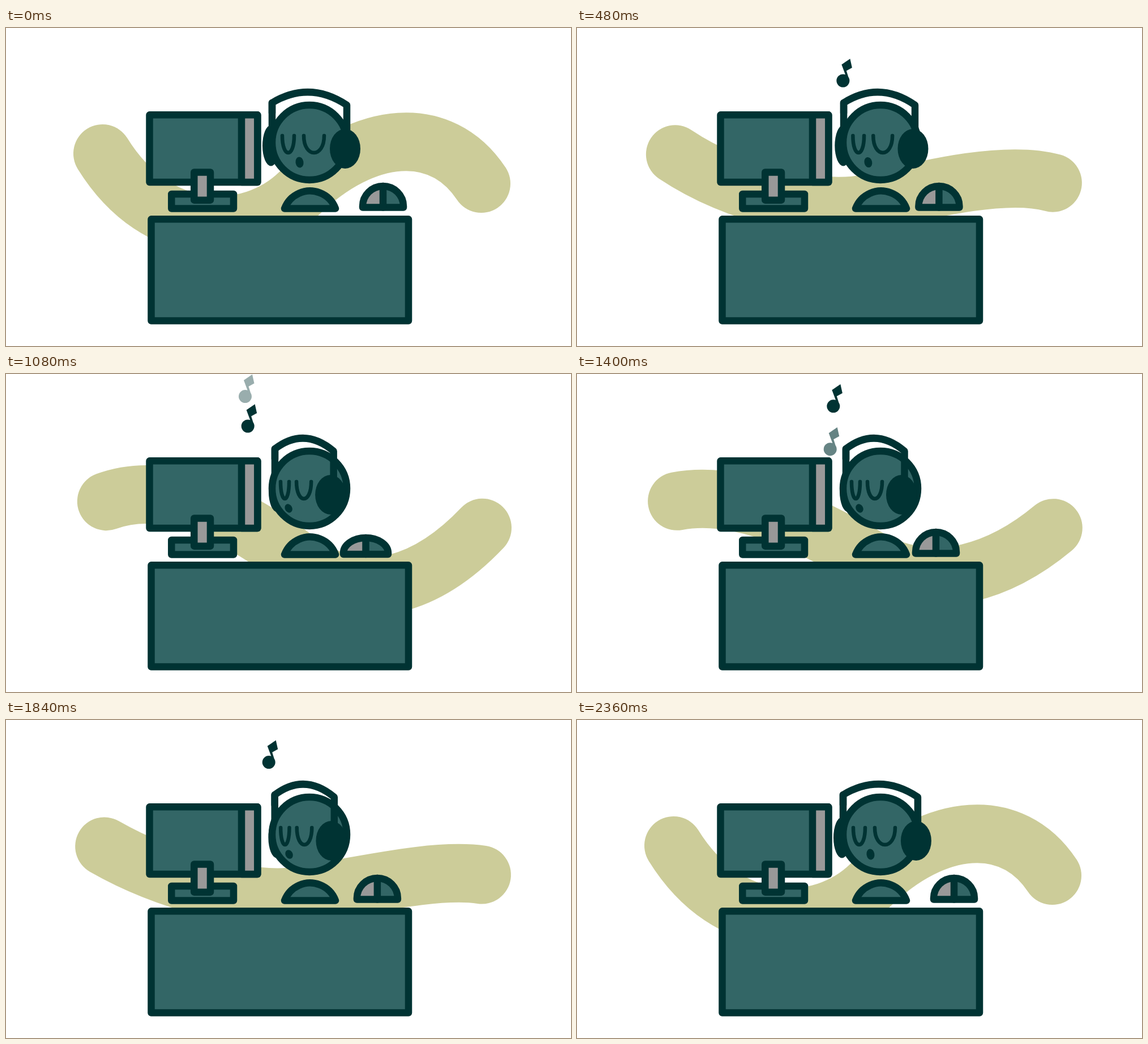
Recreate the animation shown at these times as an HTML page with a canvas. Size 998x561 px, loop 2400 ms.

```html
<!DOCTYPE html>
<html lang="en">
<head>
<meta charset="utf-8">
<title>Music at the desk</title>
<style>
  html, body { margin: 0; width: 100%; height: 100%; overflow: hidden; background: #fff; }
  canvas { display: block; width: 100vw; height: 100vh; }
</style>
</head>
<body>
<canvas id="stage" width="998" height="561"></canvas>
<script>
const ctx = document.getElementById('stage').getContext('2d');
const DARK = '#003333', TEAL = '#336666', SAND = '#cccc99', GREY = '#999999';
const LOOP = 2400, STEP = 40, LINE = 12.5, TAU = Math.PI * 2;

const clamp = v => Math.max(0, Math.min(1, v));
const mix = (a, b, p) => a + (b - a) * p;
const ramp = (t, from, to) => clamp((t - from) / (to - from));
const ease = (t, from, to) => {
  const x = ramp(t, from, to);
  return x * x * (3 - 2 * x);
};
const sway = (t, peak, period, centre, reach) =>
  centre + reach * Math.cos(TAU * (t - peak) / period);

function shape(build, fill, stroke, width = LINE) {
  ctx.beginPath();
  build();
  if (fill) { ctx.fillStyle = fill; ctx.fill(); }
  if (stroke) { ctx.strokeStyle = stroke; ctx.lineWidth = width; ctx.stroke(); }
}

const box = (x0, y0, x1, y1, fill) =>
  shape(() => ctx.rect(x0, y0, x1 - x0, y1 - y0), fill, DARK);

const oval = (x, y, rx, ry, angle = 0) =>
  shape(() => ctx.ellipse(x, y, rx, ry, angle, 0, TAU), DARK);

const line = (x0, y0, x1, y1) =>
  shape(() => { ctx.moveTo(x0, y0); ctx.lineTo(x1, y1); }, null, DARK);

// A wave of two arcs whose handles tilt from one side to the other
function drawRibbon(t) {
  const p = clamp(1 - Math.abs(t - 1185) / 1145);
  const x0 = mix(170.5, 178, p), y0 = mix(221.5, 225, p);
  const x1 = 518, y1 = mix(291.5, 335, p);
  const x2 = mix(839.5, 841.7, p), y2 = mix(274.5, 271, p);
  const tilt = mix(-97, 92, p);
  shape(() => {
    ctx.moveTo(x0, y0);
    ctx.bezierCurveTo(x0 + mix(98, 125, p), y0 + mix(158, -65, p),
                      x1 - 85, y1 - tilt * 0.85, x1, y1);
    ctx.bezierCurveTo(x1 + 115, y1 + tilt * 1.15,
                      x2 - mix(71, 92, p), y2 + mix(-107, 115, p), x2, y2);
  }, null, SAND, 103);
}

function drawNote(x, y, alpha) {
  if (alpha <= 0) return;
  ctx.save();
  ctx.globalAlpha = alpha;
  ctx.translate(x, y);
  shape(() => {
    ctx.arc(0, 0, 11.5, 0, TAU);
    ctx.closePath();
    ctx.moveTo(7, -3);
    ctx.lineTo(-2.5, -28.5);
    ctx.lineTo(12.5, -38.8);
    ctx.lineTo(16, -23);
    ctx.lineTo(6, -17.5);
    ctx.lineTo(11.5, 0);
    ctx.closePath();
  }, DARK);
  ctx.restore();
}

function drawNotes(t) {
  const fade = (time, from, to) => ramp(time, from, from + 100) - ramp(time, to, to + 100);
  const beat = t % (LOOP / 2), s = beat - 480;
  drawNote(sway(beat, 500, 1240, 446, 24), 93 - 0.125 * s + 0.00006 * s * s, fade(beat, 140, 1020));
  drawNote(sway(t, 760, 760, 443, 18), 92 - 0.11 * (t - 1080), fade(t, 740, 1600));
}

function drawEye(x0, x1) {
  shape(() => {
    ctx.moveTo(x0, 190);
    ctx.bezierCurveTo(x0, 230, x1, 230, x1, 190);
  }, null, DARK, 6.5);
}

function drawHead(t) {
  const turn = ease(t, 210, 1120) - ease(t, 1750, 2380);
  const left = mix(470, 475, turn), right = mix(602, 578.5, turn);

  oval(mix(468, 479, turn), 207.5, 15, 36);
  line(left, 132, left, 178);
  shape(() => ctx.arc(536, 202, 66, 0, TAU), TEAL, DARK);
  shape(() => {
    ctx.moveTo(left, 150);
    ctx.lineTo(left, 132);
    ctx.quadraticCurveTo((left + right) / 2, 92.5, right, 136);
    ctx.lineTo(right, 205);
  }, null, DARK);
  oval(mix(599, 573, turn), 213, 27, 35);

  drawEye(mix(488, 485, turn), mix(509, 500, turn));
  drawEye(mix(526, 513, turn), mix(562, 539, turn));
  oval(mix(518.5, 499, turn), 237, mix(7, 6.3, turn), mix(9.5, 8, turn), mix(-0.15, -0.5, turn));
}

function drawBody() {
  const half = 45, rise = 31;
  const r = (half * half + rise * rise) / (2 * rise);
  const a = Math.asin(half / r);
  shape(() => {
    ctx.arc(537, 287.5 + r, r, -Math.PI / 2 - a, -Math.PI / 2 + a);
    ctx.closePath();
  }, TEAL, DARK);
}

function drawMouse(t) {
  const away = ease(t, 0, 650) - ease(t, 1440, 2080);
  const press = ease(t, 800, 1000) - ease(t, 1080, 1280);
  const x = 666 - 32 * away + 1.5 * press;
  const rx = mix(36, 39.5, press), base = mix(316.5, 318, press);
  const top = mix(279, 289, press), hip = base - 2;
  const dome = () => {
    ctx.moveTo(x - rx, base);
    ctx.lineTo(x - rx, hip);
    ctx.ellipse(x, hip, rx, hip - top, 0, Math.PI, TAU);
    ctx.lineTo(x + rx, base);
    ctx.closePath();
  };
  shape(dome, TEAL);
  ctx.save();
  ctx.beginPath();
  ctx.rect(x - 60, 250, 60, 90);
  ctx.clip();
  shape(dome, GREY);
  ctx.restore();
  shape(dome, null, DARK);
  line(x, top, x, base);
}

function drawComputer() {
  box(253.5, 153.3, 444.3, 272, TEAL);
  box(416, 153.3, 444.3, 272, GREY);
  box(292.3, 293, 402, 318.5, TEAL);
  box(332.3, 254.5, 361, 303.7, GREY);
}

function draw(t) {
  ctx.fillStyle = '#fff';
  ctx.fillRect(0, 0, 998, 561);
  drawRibbon(t);
  drawNotes(t);
  drawHead(t);
  drawBody();
  drawMouse(t);
  drawComputer();
  box(256.5, 337.3, 711, 516.5, TEAL);
}

ctx.lineCap = ctx.lineJoin = 'round';
const start = performance.now();
function tick() {
  const t = (performance.now() - start) % LOOP;
  draw(Math.floor(t / STEP) * STEP);
  requestAnimationFrame(tick);
}
tick();
</script>
</body>
</html>
```
